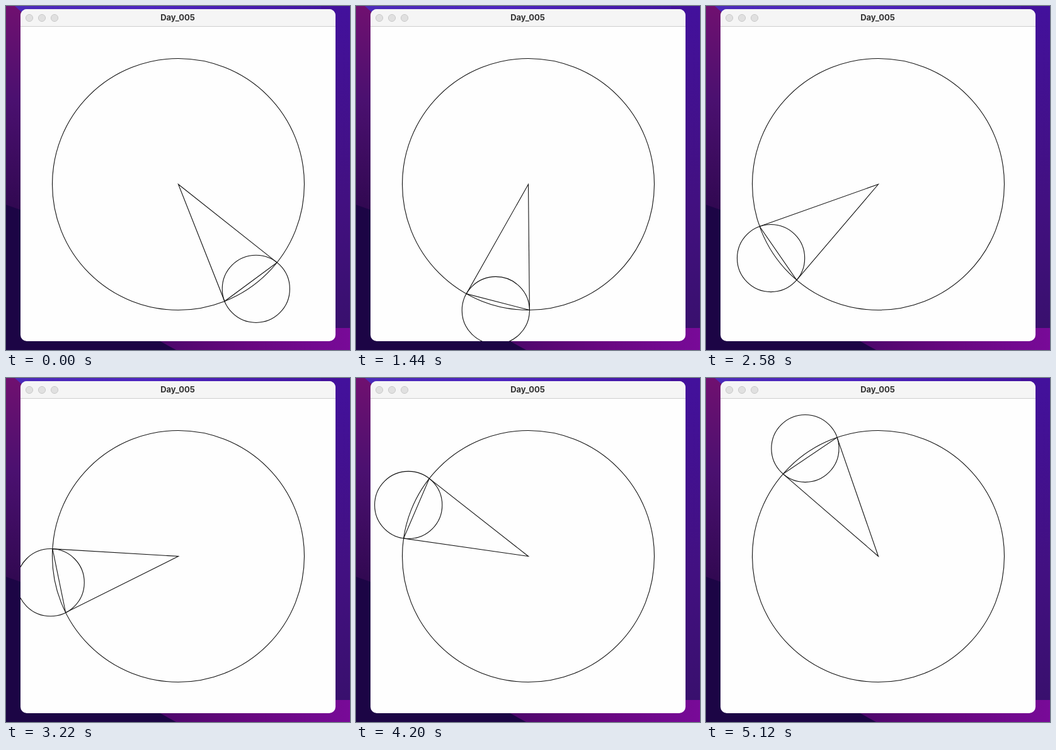
Recreate the animation shown at these times as an HTML page. Size 546 px wide and 547 px high, loop 5.22 s.

```html
<!DOCTYPE html>
<html lang="en">
<head>
<meta charset="utf-8">
<title>Day_005</title>
<style>
  html, body { margin: 0; width: 100%; height: 100%; overflow: hidden; background: #1c0545; }
  svg { display: block; }
  .lines { fill: none; stroke: #111; stroke-width: 1.1; }
  .lights { fill: #e0e0e0; stroke: #c9c9c9; }
  .title { font: 700 13px Inter, sans-serif; fill: #333; text-anchor: middle; }
</style>
</head>
<body>
<svg width="546" height="547" viewBox="0 0 546 547">
  <defs>
    <linearGradient id="left" x2="0" y2="1">
      <stop stop-color="#701070"/><stop offset=".45" stop-color="#4b1070"/>
      <stop offset="1" stop-color="#300850"/>
    </linearGradient>
    <linearGradient id="top">
      <stop stop-color="#4b2ab8"/><stop offset=".4" stop-color="#4d25c0"/>
      <stop offset="1" stop-color="#40129c"/>
    </linearGradient>
    <linearGradient id="right" x2="0" y2="1">
      <stop stop-color="#43119c"/><stop offset=".6" stop-color="#421080"/>
      <stop offset="1" stop-color="#38106c"/>
    </linearGradient>
    <linearGradient id="bottom">
      <stop stop-color="#4a0768"/><stop offset=".5" stop-color="#680780"/>
      <stop offset="1" stop-color="#780a98"/>
    </linearGradient>
    <clipPath id="window"><rect x="23" y="5" width="500" height="528" rx="10"/></clipPath>
  </defs>

  <path fill="url(#left)" d="M0 0H40V330L0 316Z"/>
  <path fill="url(#top)" d="M14 0H546V20H36Z"/>
  <path fill="url(#right)" d="M500 0H546V530H500Z"/>
  <path fill="url(#bottom)" d="M230 525L270 547H546V512H500Z"/>

  <g clip-path="url(#window)">
    <rect x="23" y="5" width="500" height="528" fill="#fefefe"/>
    <rect x="23" y="5" width="500" height="27" fill="#f5f5f5"/>
    <rect x="23" y="32" width="500" height="1" fill="#cfcfcf"/>
    <g class="lights">
      <circle cx="37" cy="19" r="5.6"/><circle cx="57" cy="19" r="5.6"/><circle cx="77" cy="19" r="5.6"/>
    </g>
    <text class="title" x="272.5" y="23.3">Day_005</text>
    <g class="lines">
      <circle cx="273.5" cy="283.5" r="200"/>
      <path id="wedge"/>
      <circle id="orbiter"/>
    </g>
  </g>
</svg>
<script>
const LOOP = 5220, STEP = 5120 / 89, LAST = 89;
const CX = 273.5, CY = 283.5, R = 200, HALF = Math.PI / 12;
// [step, direction of the wedge in degrees], linear in between
const KEYS = [[0, 53.45], [10, 74.1], [15, 83.55], [20, 94.3], [35, 124.75],
              [45, 145.4], [56, 168.4], [73, 203.2], [LAST, 235.9]];
const wedge = document.getElementById('wedge');
const orbiter = document.getElementById('orbiter');

// The small circle meets the big one at right angles at both wedge corners.
orbiter.setAttribute('r', R * Math.tan(HALF));

const polar = (radius, angle) => [CX + radius * Math.cos(angle), CY + radius * Math.sin(angle)];

function direction(step) {
  const next = Math.max(1, KEYS.findIndex(([s]) => s >= step));
  const [s0, a0] = KEYS[next - 1], [s1, a1] = KEYS[next];
  return (a0 + (a1 - a0) * (step - s0) / (s1 - s0)) * Math.PI / 180;
}

function draw() {
  const time = performance.now() % LOOP;
  const angle = direction(Math.min(LAST, Math.floor((time + 9) / STEP)));
  const [x, y] = polar(R / Math.cos(HALF), angle);
  orbiter.setAttribute('cx', x);
  orbiter.setAttribute('cy', y);
  wedge.setAttribute('d', `M${CX} ${CY}L${polar(R, angle - HALF)}L${polar(R, angle + HALF)}Z`);
  requestAnimationFrame(draw);
}
draw();
</script>
</body>
</html>
```
